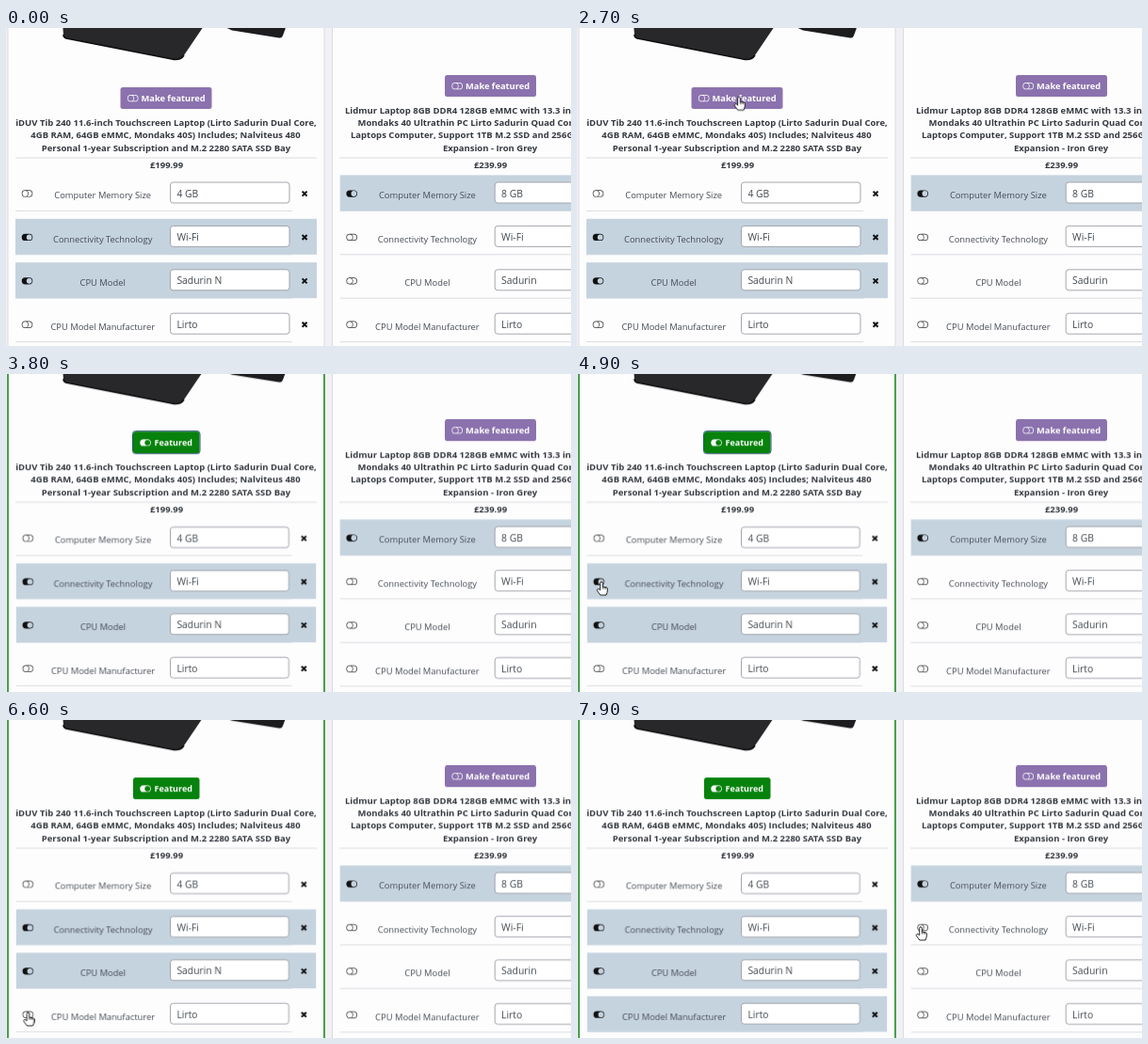
Write an HTML page that moves like this. It is 600x338 px and loops after 8000 ms.

```html
<!DOCTYPE html>
<html lang="en">
<head>
<meta charset="utf-8">
<title>Laptop comparison</title>
<style>
html, body { margin: 0; width: 100%; height: 100%; overflow: hidden; background: #f1f0f4; }
svg { display: block; width: 600px; height: 338px; font-family: "Open Sans", "Noto Sans", sans-serif; }
.title { font-size: 9.5px; font-weight: 700; fill: #34383e; }
.label { font-size: 9.4px; fill: #454b52; }
.value { font-size: 10.4px; fill: #42484f; }
.btn { font-size: 9.3px; font-weight: 700; fill: #fff; }
.mid { text-anchor: middle; }
.line { stroke: #d9dce0; }

.page, .left, .before, .after, .ring, .blink, .late, .cursor { animation: 8s step-end infinite; }
.page { animation-name: lift; }
.left { animation-name: shrink; transform-origin: 170px 250px; }
.before { animation-name: before; }
.after { animation-name: after; }
.ring { animation-name: ring; }
.blink { animation-name: blink; }
.late { animation-name: late; }
.cursor { animation-name: move; animation-timing-function: linear; }

@keyframes lift { 0% { transform: none; } 36.2%, 100% { transform: translateY(-1.8px); } }
@keyframes shrink { 0% { transform: none; } 36.2%, 100% { transform: scale(.995); } }
@keyframes before { 0% { opacity: 1; } 36.2%, 100% { opacity: 0; } }
@keyframes after { 0% { opacity: 0; } 36.2%, 100% { opacity: 1; } }
@keyframes ring { 0% { opacity: 0; } 36.2% { opacity: 1; } 62.5%, 100% { opacity: 0; } }
@keyframes blink { 0% { opacity: 1; } 62.5% { opacity: 0; } 68.7%, 100% { opacity: 1; } }
@keyframes late { 0% { opacity: 0; } 83.7%, 100% { opacity: 1; } }
@keyframes move {
  0%, 2.5% { transform: translate(608px, 250px); }
  3.75% { transform: translate(590px, 240px); }
  11.25% { transform: translate(200px, 95px); }
  15%, 23.75% { transform: translate(176.5px, 77px); }
  25% { transform: translate(173px, 76px); }
  33.75%, 38.75% { transform: translate(172px, 73.3px); }
  46% { transform: translate(-14px, 215px); }
  55% { transform: translate(-14px, 170px); }
  61%, 72.5% { transform: translate(26px, 221px); }
  76% { transform: translate(88px, 255px); }
  82.5%, 84% { transform: translate(23.5px, 311px); }
  91.25%, 93.75% { transform: translate(440px, 171px); }
  98.75%, 100% { transform: translate(365px, 220px); }
}
</style>
</head>
<body>
<svg viewBox="0 0 600 338">
  <defs>
    <path id="off" d="M11 4a4 4 0 0 1 0 8H8a5 5 0 0 0 2-4 5 5 0 0 0-2-4zM5 12a4 4 0 1 1 0-8 4 4 0 0 1 0 8zM0 8a5 5 0 0 0 5 5h6a5 5 0 0 0 0-10H5a5 5 0 0 0-5 5z"/>
    <path id="on" d="M5 3a5 5 0 0 0 0 10h6a5 5 0 0 0 0-10zM11 12a4 4 0 1 1 0-8 4 4 0 0 1 0 8z"/>
  </defs>

  <rect x="2" y="-9" width="336" height="360" fill="#fdfdfe" stroke="#dcdce0"/>
  <rect x="346.5" y="-9" width="336" height="360" fill="#fdfdfe" stroke="#dcdce0"/>
  <rect class="after" x="2" y="-9" width="336" height="360" fill="none" stroke="#36973a" stroke-width="1.8"/>

  <g class="page">
    <path d="M60-5L61 7q0 3 3 4L176 33q9 2 13-4L212-5z" fill="#28282a"/>
    <path d="M61 7q0 3 3 4L176 33q9 2 13-4" fill="none" stroke="#0e0e10" stroke-width="1.6"/>
    <path d="M228-3H298L294 8q-1 3-4 2.4L240 2.5z" fill="#1d1d20"/>

    <g class="before" id="offer"></g>
    <g class="after">
      <rect x="135" y="63" width="70.5" height="23" rx="2.5" fill="#07820c"/>
      <use href="#on" fill="#fff" transform="translate(142.3 69) scale(.72)"/>
      <text class="btn" x="157.5" y="78.3" style="font-size:9px">Featured</text>
    </g>
    <rect class="ring" x="134.5" y="62.5" width="71.5" height="24" rx="3" fill="none" stroke="#24566b"/>

    <g class="title mid">
      <text x="170" y="104.3">iDUV Tib 240 11.6-inch Touchscreen Laptop (Lirto Sadurin Dual Core,</text>
      <text x="169.5" y="117.4">4GB RAM, 64GB eMMC, Mondaks 40S) Includes; Nalviteus 480</text>
      <text x="170" y="130.6">Personal 1-year Subscription and M.2 2280 SATA SSD Bay</text>
      <text x="170.5" y="149.2">£199.99</text>
      <text x="514" y="130.6">Expansion - Iron Grey</text>
      <text x="514.5" y="149.2">£239.99</text>
    </g>
    <g class="title">
      <text x="360" y="90.6">Lidmur Laptop 8GB DDR4 128GB eMMC with 13.3 inch</text>
      <text x="373.5" y="104">Mondaks 40 Ultrathin PC Lirto Sadurin Quad Core</text>
      <text x="366" y="117.3">Laptops Computer, Support 1TB M.2 SSD and 256GB</text>
    </g>
    <path class="line" d="M10 138H330M354 138H600"/>

    <g class="left" id="left"></g>
    <g id="right"></g>
  </g>

  <g class="cursor">
    <path d="M-1.3 1.2a1.3 1.3 0 0 1 2.6 0V5l4 .8q1.4.4 1.2 2L6 11.3 5 14H-1.2L-4 10.2-4.8 8.3q.8-1.5 2-.7l1.5 1.2z" fill="#fff" stroke="#111" stroke-width=".9" stroke-linejoin="round"/>
    <path d="M1.3 5V7.5M3 5.5V7.6M4.8 6V7.9" stroke="#111" stroke-width=".7"/>
  </g>
</svg>

<script>
const labels = ["Computer Memory Size", "Connectivity Technology", "CPU Model", "CPU Model Manufacturer"];

const icon = (name, x, y, fill = "#111") =>
  `<use href="#${name}" fill="${fill}" transform="translate(${x - 5.8} ${y - 5.8}) scale(.725)"/>`;

const offer = (x, y) =>
  `<rect x="${x}" y="${y}" width="97" height="23" rx="2.5" fill="#8b72ae"/>` +
  icon("off", x + 13.2, y + 11.7, "#fff") +
  `<text class="btn" x="${x + 22}" y="${y + 15.2}">Make featured</text>`;

// "lit" holds one class per row; null leaves the row plain
function rows(x, values, lit) {
  return values.map((value, i) => {
    const y = 164 + i * 46.4;
    const mid = y + 12;
    const band = lit[i] === null ? "" :
      `<g class="${lit[i]}"><rect x="${x}" y="${y - 7.6}" width="320" height="38" fill="#c5d3df"/>` +
      icon("on", x + 12.5, mid) + `</g>`;
    return `<path class="line" d="M${x} ${y + 30.4}h294"/>` +
      icon("off", x + 12.5, mid, "#333") + band +
      `<text class="label mid" x="${x + 92.7}" y="${y + 17.4}">${labels[i]}</text>` +
      `<rect x="${x + 164.5}" y="${y}" width="126.5" height="22" rx="3" fill="#fff" stroke="#9a9ea5" stroke-width=".9"/>` +
      `<text class="value" x="${x + 171.4}" y="${y + 15.6}">${value}</text>` +
      `<path d="M${x + 304.6} ${mid - 2.4}l5 5m0-5l-5 5" stroke="#111" stroke-width="2"/>`;
  }).join("");
}

const put = (id, html) => document.getElementById(id).innerHTML = html;
put("offer", offer(121.5, 63));
put("left", rows(10, ["4 GB", "Wi-Fi", "Sadurin N", "Lirto"], [null, "blink", "", "late"]));
put("right", offer(466, 50) + rows(354.7, ["8 GB", "Wi-Fi", "Sadurin", "Lirto"], ["", null, null, null]));
</script>
</body>
</html>
```
